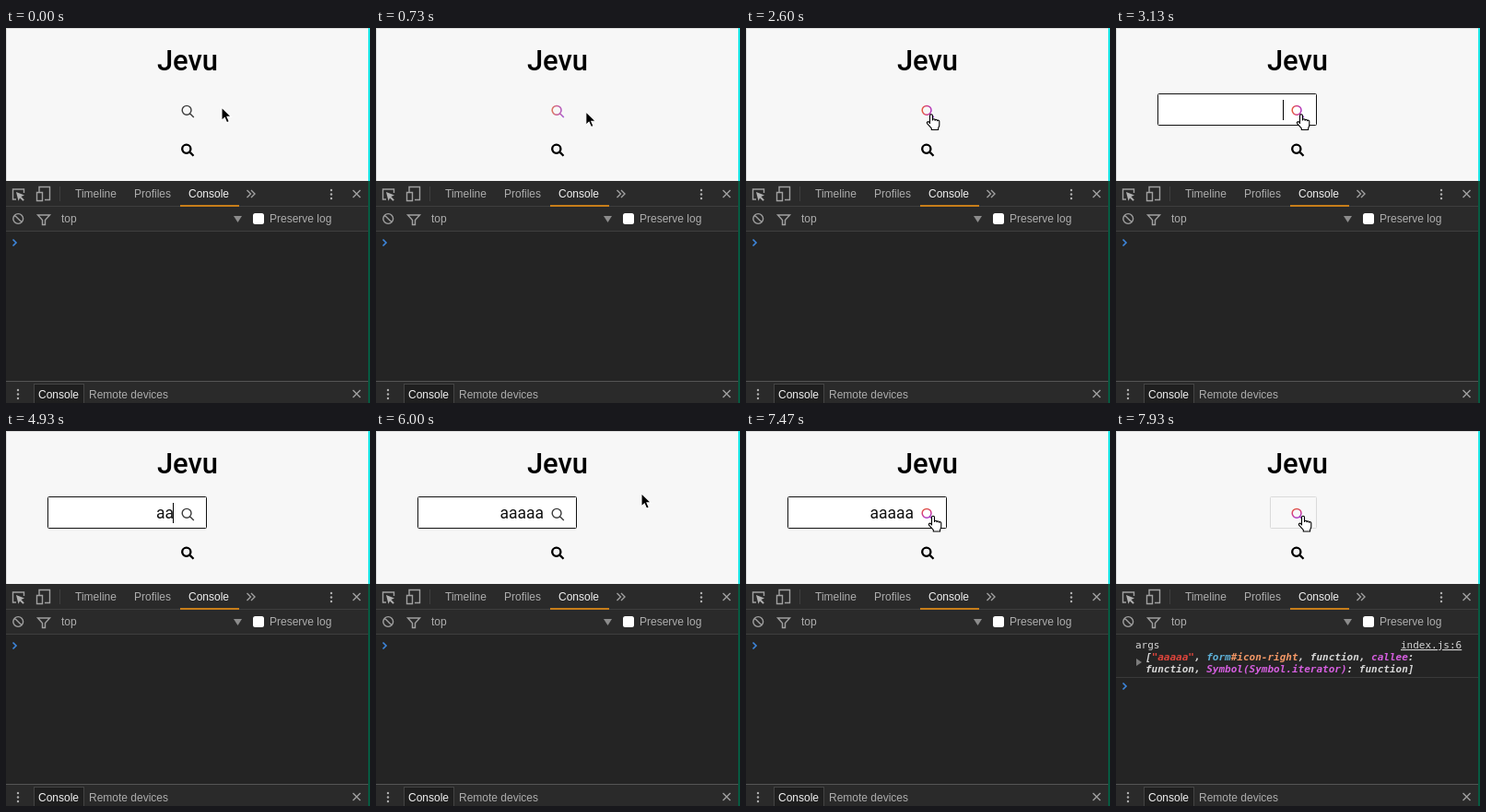
Write an HTML page that moves like this. It is 395 by 407 pixels and loops after 8000 ms.

```html
<!DOCTYPE html>
<html lang="en">
<head>
<meta charset="utf-8">
<title>Search field</title>
<style>
  html, body { margin: 0; width: 100%; height: 100%; overflow: hidden; background: #f7f7f7; }
  svg { display: block; width: 395px; height: 407px; }
  text { font: 12px "Liberation Sans", Arial, sans-serif; fill: #adadad; white-space: pre; }
  .on { fill: #f2f2f2; }
  .title { font: 500 31px Roboto, sans-serif; fill: #000; text-anchor: middle; }
  #value { font: 17.5px Roboto, sans-serif; fill: #111; text-anchor: end; }
  #log text { font: 11px "DejaVu Sans Mono", monospace; fill: #d6d6d6; }
  #log .obj { font-weight: bold; font-style: italic; }
  .line { fill: none; stroke: #a0a0a0; stroke-width: 1.4; }
</style>
</head>
<body>
<svg viewBox="0 0 395 407">
  <defs>
    <linearGradient id="hue" gradientUnits="userSpaceOnUse" x1="190" y1="89" x2="204" y2="89">
      <stop offset="0" stop-color="#e8622c"/>
      <stop offset=".5" stop-color="#d0388c"/>
      <stop offset="1" stop-color="#9a3be0"/>
    </linearGradient>
    <path id="lens" d="M201 89.3a4.9 4.9 0 1 1-9.8 0a4.9 4.9 0 0 1 9.8 0M199.6 92.8l4.2 4.2"/>
    <g id="dots" fill="#b0b0b0"><circle r="1.2" cy="-4.5"/><circle r="1.2"/><circle r="1.2" cy="4.5"/></g>
    <path id="close" class="line" d="M-4-4l8 8M4-4l-8 8"/>
    <clipPath id="clip"><rect id="clipBox" y="71" height="36"/></clipPath>
  </defs>

  <!-- page -->
  <path fill="#f7f7f7" d="M0 0h395v166H0z"/>
  <path fill="#dedede" d="M0 0h393v1H0zM0 0h1v166H0z"/>
  <text class="title" x="197" y="46">Jevu</text>
  <g id="field">
    <rect id="box" y="71.5" height="34" rx="1" fill="#fff" stroke="#111"/>
    <text id="value" x="182" y="95" clip-path="url(#clip)"></text>
  </g>
  <path id="caret" fill="#000" d="M181 78h1v22h-1z"/>
  <use id="cold" href="#lens" fill="none" stroke="#3c3c3c" stroke-width="1.4"/>
  <use id="hot" href="#lens" fill="none" stroke="url(#hue)" stroke-width="1.5"/>
  <path fill="none" stroke="#000" stroke-width="2.3" d="M200.4 131.2a4.6 4.6 0 1 1-9.2 0a4.6 4.6 0 0 1 9.2 0M199.2 134.4l4.3 4.3"/>

  <!-- developer tools -->
  <path fill="#242424" d="M0 166h395v241H0z"/>
  <path fill="#2a2a2a" d="M0 166h395v54H0zM0 384h395v23H0z"/>
  <path fill="#3e3e3e" d="M0 193h395v1H0zM0 220h395v1H0zM58 172h1v16h-1z"/>
  <path fill="#555" d="M0 383h395v1H0z"/>
  <path fill="#c77d1a" d="M189 192h64v2h-64z"/>
  <path class="line" stroke-width="1.2" d="M11 186H7.5v-11h12v4M36 178v-5.5h11.5v14H42M33.5 178.5h6v9h-6z"/>
  <path fill="#b0b0b0" d="M11 178l9 3.5-3.6 1.5 3.4 3.4-1.4 1.4-3.4-3.4-1.5 3.4z"/>
  <text x="75" y="184">Timeline</text>
  <text x="139" y="184">Profiles</text>
  <text x="198" y="184" class="on">Console</text>
  <path class="line" d="M261.5 176l4 4-4 4M266 176l4 4-4 4"/>
  <use href="#dots" x="353" y="180.5"/>
  <use href="#close" x="380.5" y="180"/>
  <path class="line" stroke-width="1.8" d="M18.6 207a5.4 5.4 0 1 1-10.8 0a5.4 5.4 0 0 1 10.8 0M9.4 203.2l7.6 7.6"/>
  <path class="line" d="M34.5 203h13l-5 5.5v5h-3v-5z"/>
  <text x="60" y="211">top</text>
  <path fill="#8c8c8c" d="M247 204h9l-4.5 7z"/>
  <rect x="268" y="201" width="12" height="12" rx="2.5" fill="#fff"/>
  <text x="286" y="211">Preserve log</text>

  <g id="log">
    <text x="21" y="236">args</text>
    <text x="309" y="236" text-decoration="underline">index.js:6</text>
    <path fill="#7c7c7c" d="M22 247l6 4-6 4z"/>
    <text class="obj" x="32" y="249">[<tspan fill="#e0453c">"aaaaa"</tspan>, <tspan fill="#5db0d7">form</tspan><tspan fill="#f29766">#icon-right</tspan>, function, <tspan fill="#d65fe0">callee</tspan>:</text>
    <text class="obj" x="32" y="262">function, <tspan fill="#d65fe0">Symbol(Symbol.iterator)</tspan>: function]</text>
    <path fill="#3a3a3a" d="M0 267h393v1H0z"/>
  </g>
  <path id="prompt" fill="none" stroke="#3d86dc" stroke-width="1.6" d="M7.5 229.5l3.5 3.5-3.5 3.5"/>

  <rect x="30.5" y="386.5" width="54" height="21" fill="#1f1f1f" stroke="#444"/>
  <use href="#dots" x="13" y="397.5"/>
  <text x="35" y="402" class="on">Console</text>
  <text x="90" y="402">Remote devices</text>
  <use href="#close" x="380.5" y="397"/>

  <path fill="#1fe9e9" d="M393 0h2v166h-2z"/>
  <path fill="#075a41" d="M393 166h2v241h-2z"/>

  <path id="arrow" fill="#000" stroke="#fff" stroke-width="1.1" d="M0 0v14.5l3.3-3.1 2.3 5.3 2.7-1.1-2.3-5.2h4.5z"/>
  <path id="hand" fill="#fff" stroke="#000" stroke-width="1.1" stroke-linejoin="round"
    d="M-1.5 10.5V2.2a1.5 1.5 0 0 1 3 0V7a1.3 1.3 0 0 1 2.6.2a1.3 1.3 0 0 1 2.5.5a1.2 1.2 0 0 1 2.2.8v4q0 1.6-1.2 3v2H.3v-1.7q-2.5-2.8-4.8-5.2a1.3 1.3 0 0 1 2-1.6z"/>
</svg>
<script>
const LOOP = 8000, TICK = 1000 / 15;
const $ = id => document.getElementById(id);
const set = (id, attrs) => { for (const k in attrs) $(id).setAttribute(k, attrs[k]); };
const show = (id, on) => set(id, { visibility: on ? 'visible' : 'hidden' });
const ramp = (t, a, b) => Math.min(1, Math.max(0, (t - a) / (b - a)));
const ease = p => p * p * (3 - 2 * p);
const within = (t, spans) => spans.some(([a, b]) => t >= a && t < b);

// pointer hotspot: time, x, y
const route = [
  [0, 234, 86], [400, 201, 97], [600, 201, 97], [933, 277, 79.5],
  [2067, 277, 79.5], [2600, 201, 93], [4000, 201, 93], [4001, 288, 67.5],
  [6467, 288, 67.5], [7333, 204, 90], [7467, 203, 91.5], [LOOP, 203, 91.5]
];
const hovers = [[260, 730], [2400, 4000], [7060, 9000]];
const carets = [[3130, 3590], [3990, 5260], [5330, 5990], [6530, 7030]];
// typed length: time, count
const typing = [[4060, 1], [4190, 2], [4590, 1], [4730, 2], [5330, 3], [5395, 4], [5460, 5]];

function pointer(t) {
  const i = Math.max(1, route.findIndex(k => k[0] >= t));
  const [a, x, y] = route[i - 1], [b, u, v] = route[i];
  const p = ease(ramp(t, a, b));
  return [x + (u - x) * p, y + (v - y) * p];
}

function draw(t) {
  const shut = ease(ramp(t, 7733, 7933));
  const open = ease(ramp(t, 2867, 3133)) * (1 - shut);
  const left = 167 - 122 * open;
  set('box', { x: left + .5, width: 217 - left });
  set('clipBox', { x: left, width: 218 - left });
  set('field', { opacity: t < 2900 ? 0 : .12 + .88 * open });

  const typed = typing.filter(k => k[0] <= t).pop();
  $('value').textContent = 'a'.repeat(typed && shut < 1 ? typed[1] : 0);
  show('caret', within(t, carets));

  const glow = Math.max(...hovers.map(([a, b]) => ramp(t, a, a + 200) * (1 - ramp(t, b - 60, b + 200))));
  set('hot', { opacity: glow });
  set('cold', { opacity: 1 - glow });
  set('hue', { gradientTransform: `rotate(${t < 5000 ? 0 : 70} 197 89)` });

  const [x, y] = pointer(t), seen = !within(t, [[3990, 5590]]), over = x < 208;
  const transform = `translate(${x} ${y})`;
  set('arrow', { transform });
  set('hand', { transform });
  show('arrow', seen && !over);
  show('hand', seen && over);

  const logged = t >= 7795;
  show('log', logged);
  set('prompt', { transform: `translate(0 ${logged ? 44 : 0})` });
}

function frame() {
  const t = performance.now() % LOOP;
  draw(Math.floor((t + 4) / TICK) * TICK % LOOP);
  requestAnimationFrame(frame);
}
frame();
</script>
</body>
</html>
```
